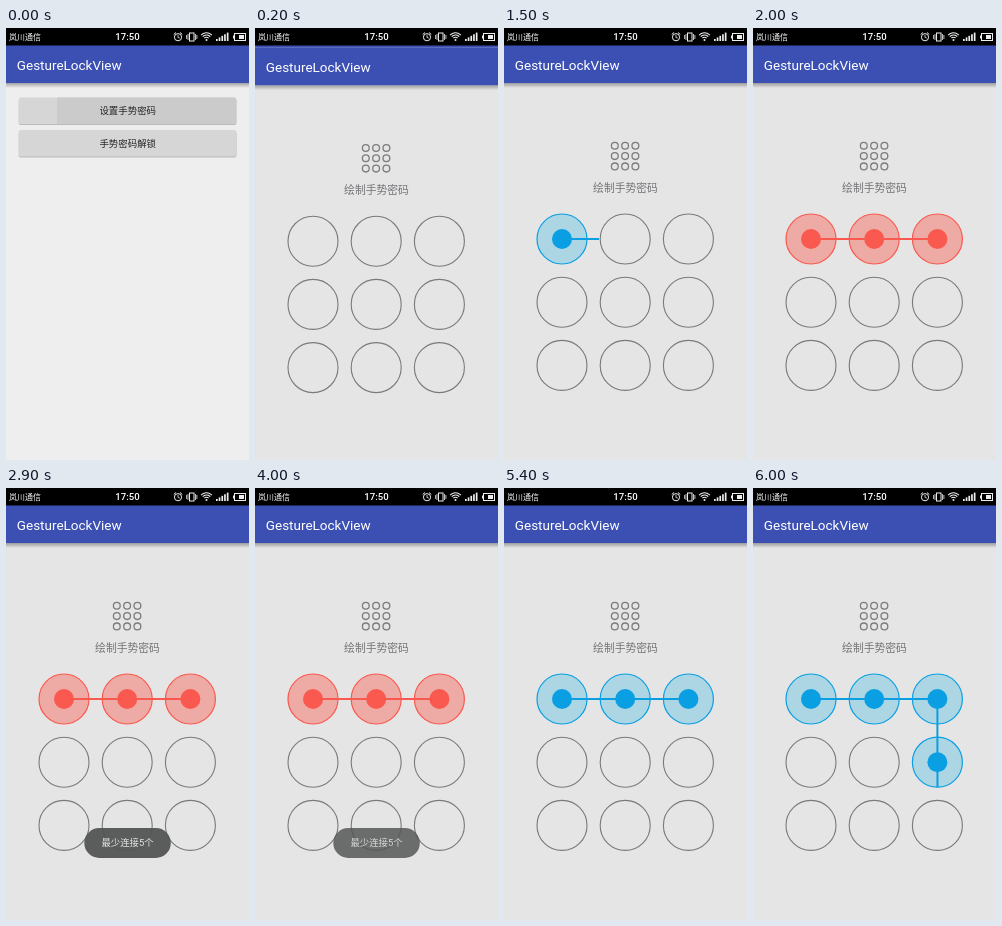
An HTML page with a canvas that plays this animation: 243 px wide and 432 px high, repeating every 6.1 s.

```html
<!DOCTYPE html>
<html lang="zh">
<head>
<meta charset="utf-8">
<title>GestureLockView</title>
<style>
  html, body { margin: 0; width: 100%; height: 100%; overflow: hidden; background: #eee; }
  canvas { display: block; width: 243px; height: 432px; }
</style>
</head>
<body>
<canvas id="stage"></canvas>
<script>
const W = 243, H = 432, LOOP = 6100, STEP = 100;
const SANS = 'Roboto, "Noto Sans CJK SC", "Noto Sans CJK", sans-serif';
const BLUE = { line: '#0a9fe2', fill: '#acd6e4' };
const RED = { line: '#fa594f', fill: '#eeaaa4' };
const canvas = document.getElementById('stage');
const ctx = canvas.getContext('2d');
const dpr = window.devicePixelRatio || 1;
canvas.width = W * dpr;
canvas.height = H * dpr;

// Finger positions: [time, x, y]
const firstTry = [[1300, 58, 211], [1400, 72, 211], [1600, 118, 211], [1800, 170, 211], [1900, 184.5, 211]];
const secondTry = [[4900, 58, 211], [5000, 70, 211], [5200, 118, 211], [5400, 170, 211],
  [5500, 182, 212], [5600, 184.5, 217], [5700, 184.5, 217], [6000, 184.5, 299]];
const cells = Array.from({ length: 9 }, (_, i) => ({ x: 58 + i % 3 * 63.2, y: 211 + Math.floor(i / 3) * 63.2 }));

const clamp = v => Math.max(0, Math.min(1, v));

function fingerAt(path, t) {
  const next = path.findIndex(k => k[0] > t);
  if (next < 0) { const [, x, y] = path.at(-1); return { x, y }; }
  const a = path[next - 1], b = path[next], p = (t - a[0]) / (b[0] - a[0]);
  return { x: a[1] + (b[1] - a[1]) * p, y: a[2] + (b[2] - a[2]) * p };
}

function visitedCells(path, t) {
  const hit = new Set();
  for (let s = path[0][0]; s <= t; s += 20) {
    const f = fingerAt(path, s);
    const cell = cells.find(c => Math.hypot(c.x - f.x, c.y - f.y) < 25);
    if (cell) hit.add(cell);
  }
  return [...hit];
}

function text(str, x, y, size, color, align = 'center', weight = 400) {
  ctx.font = `${weight} ${size}px ${SANS}`;
  ctx.textAlign = align;
  ctx.textBaseline = 'alphabetic';
  ctx.fillStyle = color;
  ctx.fillText(str, x, y);
}

function rect(x, y, w, h, color, r = 0) {
  ctx.fillStyle = color;
  ctx.beginPath();
  ctx.roundRect(x, y, w, h, r);
  ctx.fill();
}

function circle(x, y, r, stroke, width, fill) {
  ctx.beginPath();
  ctx.arc(x, y, r, 0, 2 * Math.PI);
  if (fill) { ctx.fillStyle = fill; ctx.fill(); }
  if (stroke) { ctx.strokeStyle = stroke; ctx.lineWidth = width; ctx.stroke(); }
}

function polyline(points, color, width) {
  ctx.beginPath();
  points.forEach(p => ctx.lineTo(p.x, p.y));
  ctx.strokeStyle = color;
  ctx.lineWidth = width;
  ctx.stroke();
}

function statusBar() {
  rect(0, 0, W, 17.5, '#000');
  text('岚川通信', 3, 11.8, 8, '#fff', 'left', 500);
  text('17:50', 121.5, 12.3, 9.6, '#fff', 'center', 500);
  const white = '#eee';
  // Alarm
  circle(172, 9.2, 3.6, white, 1);
  polyline([{ x: 172, y: 7 }, { x: 172, y: 9.5 }, { x: 173.8, y: 10 }], white, .8);
  polyline([{ x: 167.7, y: 6.5 }, { x: 170, y: 4.5 }], white, 1);
  polyline([{ x: 174, y: 4.5 }, { x: 176.3, y: 6.5 }], white, 1);
  // Vibrate
  ctx.strokeRect(183.5, 5, 4.5, 8);
  for (const x of [180.6, 182, 189.5, 190.9]) {
    const reach = Math.abs(x - 185.75) > 4 ? 2 : 3;
    polyline([{ x, y: 9 - reach }, { x, y: 9 + reach }], white, .8);
  }
  // Wi-Fi
  for (const r of [2.8, 5, 7.2]) {
    ctx.beginPath();
    ctx.arc(200.5, 12, r, -Math.PI * .77, -Math.PI * .23);
    ctx.lineWidth = 1.1;
    ctx.stroke();
  }
  circle(200.5, 12, 1, null, 0, white);
  // Signal and battery
  for (let i = 0; i < 5; i++) rect(210 + i * 2.7, 11 - i * 1.6, 1.7, 2 + i * 1.6, white);
  ctx.lineWidth = 1;
  ctx.strokeRect(228.5, 5.5, 11, 7);
  rect(227, 7.5, 1.2, 3, white);
  rect(233, 7, 5, 4, white);
}

function appBar() {
  const shadow = ctx.createLinearGradient(0, 55, 0, 60);
  shadow.addColorStop(0, 'rgba(0,0,0,.32)');
  shadow.addColorStop(1, 'rgba(0,0,0,0)');
  rect(0, 55, W, 5, shadow);
  rect(0, 17, W, 38, '#3c50b3');
  text('GestureLockView', 10.8, 41.6, 13.5, '#fff', 'left');
}

function button(y, label, pressed) {
  rect(12.7, y + 1, 217.8, 26.6, '#bbb', 2);
  rect(13, y, 217, 26.5, '#d6d6d6', 1.5);
  if (pressed) rect(51, y, 179, 26.5, '#cbcbcb', [0, 1.5, 1.5, 0]);
  text(label, 121.7, y + 16.7, 9.45, '#252525');
}

function homeScreen() {
  rect(0, 17, W, H, '#eee');
  button(69.5, '设置手势密码', true);
  button(102, '手势密码解锁', false);
  appBar();
}

function lockScreen(t) {
  rect(0, 17, W, H, '#e5e5e5');
  appBar();
  for (let i = 0; i < 9; i++) {
    circle(110.8 + i % 3 * 10.3, 117.8 + Math.floor(i / 3) * 10.3, 3.4, '#7c7c7c', 1.3);
  }
  text('绘制手势密码', 121.5, 163.8, 10.8, '#747478');

  const path = t >= 4900 ? secondTry : firstTry;
  const visited = visitedCells(path, t);
  const failed = t >= 2000 && t < 4900;
  const color = failed ? RED : BLUE;
  for (const c of cells) {
    if (visited.includes(c)) circle(c.x, c.y, 25, color.line, 1.2, color.fill);
    else circle(c.x, c.y, 25, '#7a7a7a', 1.1);
  }
  if (!visited.length) return;
  polyline(failed ? visited : [...visited, fingerAt(path, t)], color.line, 2);
  for (const c of visited) circle(c.x, c.y, 10, null, 0, color.line);
}

function toast(t) {
  const fadeIn = 1 - (1 - clamp((t - 2000) / 600)) ** 2;
  const fadeOut = 1 - clamp((t - 3900) / 600) ** 1.2;
  ctx.globalAlpha = fadeIn * fadeOut;
  rect(78.3, 340, 86.5, 30, 'rgba(84,86,85,.95)', 15);
  text('最少连接5个', 121.5, 358.3, 9.4, '#e6e6e6');
  ctx.globalAlpha = 1;
}

function draw(now) {
  const t = Math.floor(now % LOOP / STEP) * STEP;
  ctx.setTransform(dpr, 0, 0, dpr, 0, 0);
  if (t < 300) homeScreen();
  // The lock screen fades in while sliding up
  ctx.save();
  ctx.globalAlpha = clamp(t / 200);
  ctx.translate(0, 34 * (1 - clamp(t / 300)) ** 2.5);
  lockScreen(t);
  ctx.restore();
  toast(t);
  statusBar();
}

const start = performance.now();
function frame() {
  draw(performance.now() - start);
  requestAnimationFrame(frame);
}
frame();
</script>
</body>
</html>
```
